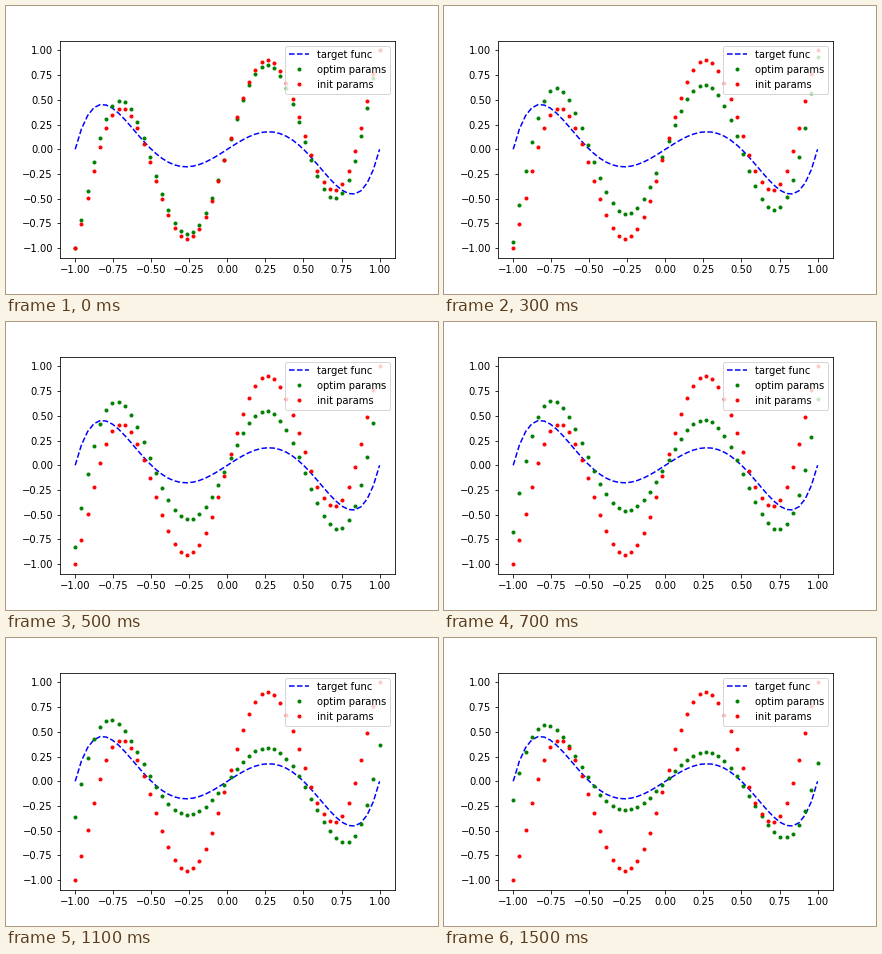
Recreate the animation shown at these times as a matplotlib script. Size 432 by 288 pixels, loop 1600 ms.

```python
import numpy as np
import matplotlib.pyplot as plt
from matplotlib.animation import FuncAnimation

FRAMES, INTERVAL = 16, 100
POWERS = np.arange(1, 10, 2)
DEGREES = np.arange(4)

x = np.linspace(-1, 1, 50)
anchors = x[[49, 47, 43, 37, 29]]

# Anchor heights: before training, then at four training steps
init = [1, .49, -.347, .13, .806]
steps = np.array([0, 3, 9, 15])
heights = [
    [1, .42, -.438, .078, .766],
    [.938, .22, -.585, -.043, .594],
    [.513, -.155, -.64, -.074, .351],
    [.19, -.296, -.56, -.043, .26],
]
path = np.linalg.solve(steps[:, None] ** DEGREES, heights)


def odd_curve(values):
    """Odd polynomial of degree nine through the anchor heights."""
    coef = np.linalg.solve(anchors[:, None] ** POWERS, values)
    return x[:, None] ** POWERS @ coef


def trained(step):
    """Curve whose anchors follow cubics in time."""
    return odd_curve(step ** DEGREES @ path)


fig, ax = plt.subplots(figsize=(6, 4), dpi=72)
fig.subplots_adjust(bottom=0.125)
ax.plot(x, 4 * x**5 - 5 * x**3 + x, "b--", label="target func")
optim, = ax.plot(x, trained(0), "g.", label="optim params")
ax.plot(x, odd_curve(init), "r.", label="init params")
ax.set(xlim=(-1.1, 1.1), ylim=(-1.1, 1.1))
ax.legend(loc="upper right")


def update(step):
    optim.set_ydata(trained(step))
    return optim,


anim = FuncAnimation(fig, update, frames=FRAMES, interval=INTERVAL, repeat=True)
plt.show()
```
